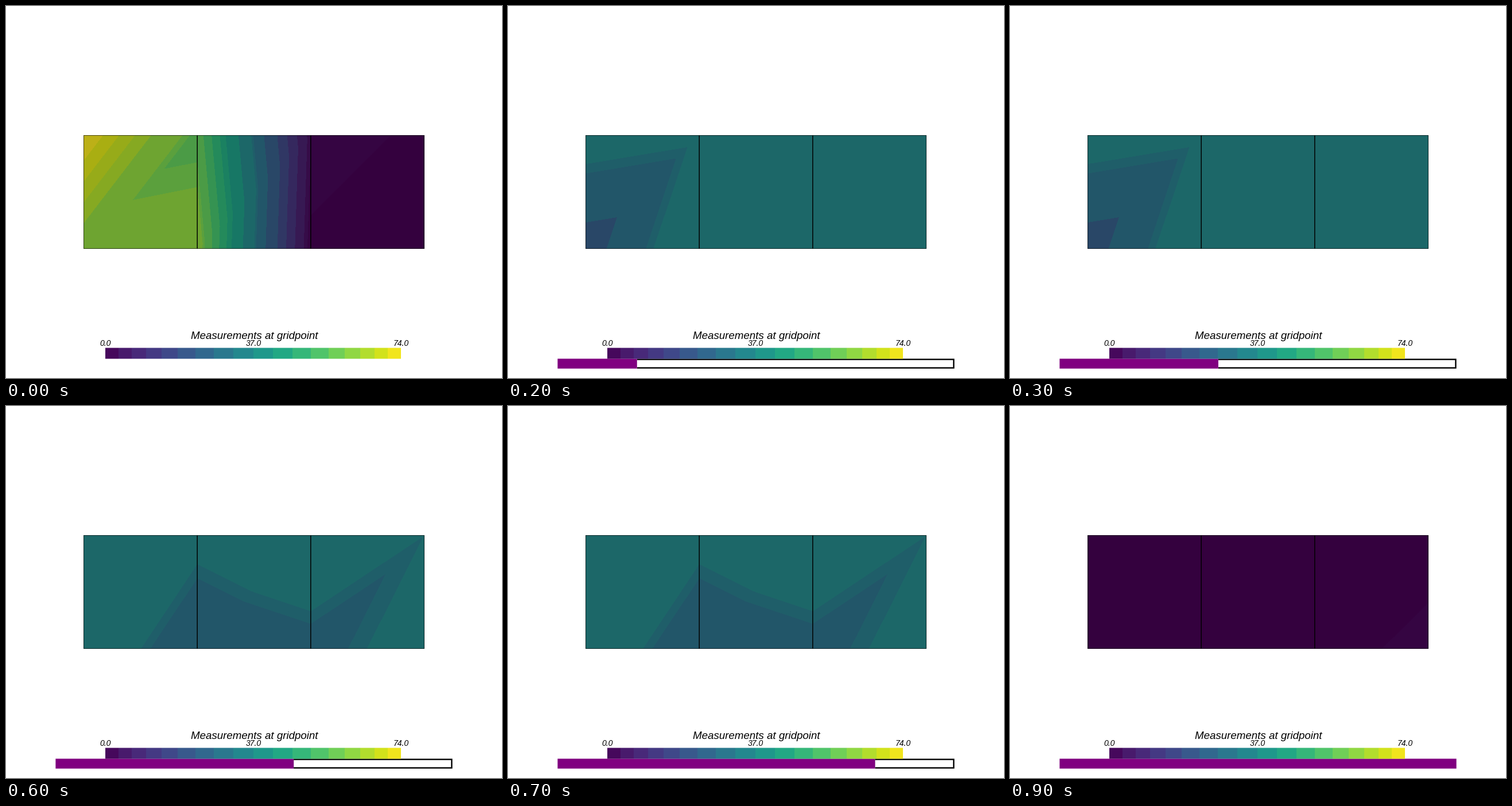
Recreate the animation shown at these times as a matplotlib script. Size 864x648 px, loop 1 s.

```python
import numpy as np
import matplotlib.pyplot as plt
from matplotlib.animation import FuncAnimation
from matplotlib.patches import Rectangle
from matplotlib.tri import Triangulation

W, H, DPI = 864, 648, 100
PX = 72 / DPI  # points per pixel

# Three square cells, each split along its rising diagonal.
XS = np.linspace(135.5, 728.5, 4)
TOP, BOTTOM = 225.5, 422.5
MESH = Triangulation(
    np.tile(XS, 2),
    np.repeat([BOTTOM, TOP], 4),
    [t for i in range(3) for t in ([i, i + 4, i + 5], [i, i + 1, i + 5])],
)

# Measured values per time step: bottom row of points, then top row.
MEASUREMENTS = [
    [61, 62, 0, 0, 74, 57, 2, 0],
    [22, 37, 34, 34, 34, 32, 34, 34],
    [34, 23, 36, 32, 38, 36, 30, 27],
    [37, 25, 28, 34, 35, 33, 37, 31],
    [0, 0, 0, 1, 0, 0, 0, 0],
]
VMAX = 74
# Colour bands are widest in the middle of the range.
LEVELS = np.r_[-0.6, 0.6, 2, 4:19:4.8, 24.8, 30, 31:44:6.2,
               46.2:59:4, 59.3, 64:73:2.4, VMAX + 0.5]

BAR_LEFT, BAR_WIDTH, BAR_BANDS = 173, 515, 18
BAR_TOP, BAR_HEIGHT = 595.5, 19

SLIDER_LEFT, SLIDER_WIDTH = 0.1 * W, 0.8 * W
SLIDER_TOP, SLIDER_HEIGHT, SLIDER_BORDER = 614.4, 17.2, 2.4

viridis = plt.get_cmap("viridis")
LIGHT = (0.765, 0.765, 0.735)
SURFACE = viridis((LEVELS[:-1] + LEVELS[1:]) / 2 / VMAX)[:, :3] * LIGHT

fig = plt.figure(figsize=(W / DPI, H / DPI), dpi=DPI, facecolor="white")
ax = fig.add_axes([0, 0, 1, 1])


def box(x, y, w, h, color):
    ax.add_patch(Rectangle((x, y), w, h, fc=color, lw=0, snap=False, zorder=3))


def line(xs, ys, width, alpha=1.0):
    ax.plot(xs, ys, color="black", lw=width * PX, alpha=alpha, zorder=4,
            snap=False, solid_capstyle="butt", solid_joinstyle="miter")


def label(x, baseline, text, size):
    ax.text(x, baseline, text, ha="center", va="baseline", fontsize=size * PX,
            family="Liberation Sans", style="italic", color="black", zorder=5)


def draw_mesh(step):
    ax.tricontourf(MESH, MEASUREMENTS[step], levels=LEVELS, colors=SURFACE,
                   antialiased=False, zorder=2)
    left, right = XS[0], XS[-1]
    line([left, right, right, left, left],
         [TOP, TOP, BOTTOM, BOTTOM, TOP], 1, 0.6)
    for x in XS[1:3]:
        line([x, x], [TOP, BOTTOM], 1.5)


def draw_slider(fraction):
    x, y, w, h = SLIDER_LEFT, SLIDER_TOP, SLIDER_WIDTH, SLIDER_HEIGHT
    b = SLIDER_BORDER
    done = w * fraction
    box(x + done, y, w - done, h, "black")
    box(x + done, y + b, max(w - done - b, 0), h - 2 * b, "white")
    box(x, y, done, h, "purple")


def draw_colorbar():
    u = np.linspace(0, 1, BAR_BANDS + 1)
    edges = np.round(BAR_WIDTH * (u - 0.033 * np.sin(2 * np.pi * u)))
    for a, b in zip(edges, edges[1:]):
        box(BAR_LEFT + a, BAR_TOP, b - a, BAR_HEIGHT,
            viridis((a + b) / 2 / BAR_WIDTH))
    label(432.5, 579.5, "Measurements at gridpoint", 18.8)
    for part in (0, 0.5, 1):
        label(BAR_LEFT + 0.5 + part * BAR_WIDTH, 591.5, f"{VMAX * part:.1f}", 14)


def draw(frame):
    ax.clear()
    ax.set_axis_off()
    # The slider moves first; the mesh follows one frame later.
    draw_mesh(frame // 2)
    if frame:
        draw_slider((frame + 1) // 2 / len(MEASUREMENTS))
    draw_colorbar()
    ax.set_xlim(0, W)
    ax.set_ylim(H, 0)
    return []


anim = FuncAnimation(fig, draw, frames=10, interval=100, init_func=lambda: [],
                     repeat=True, repeat_delay=0)
plt.show()
```
